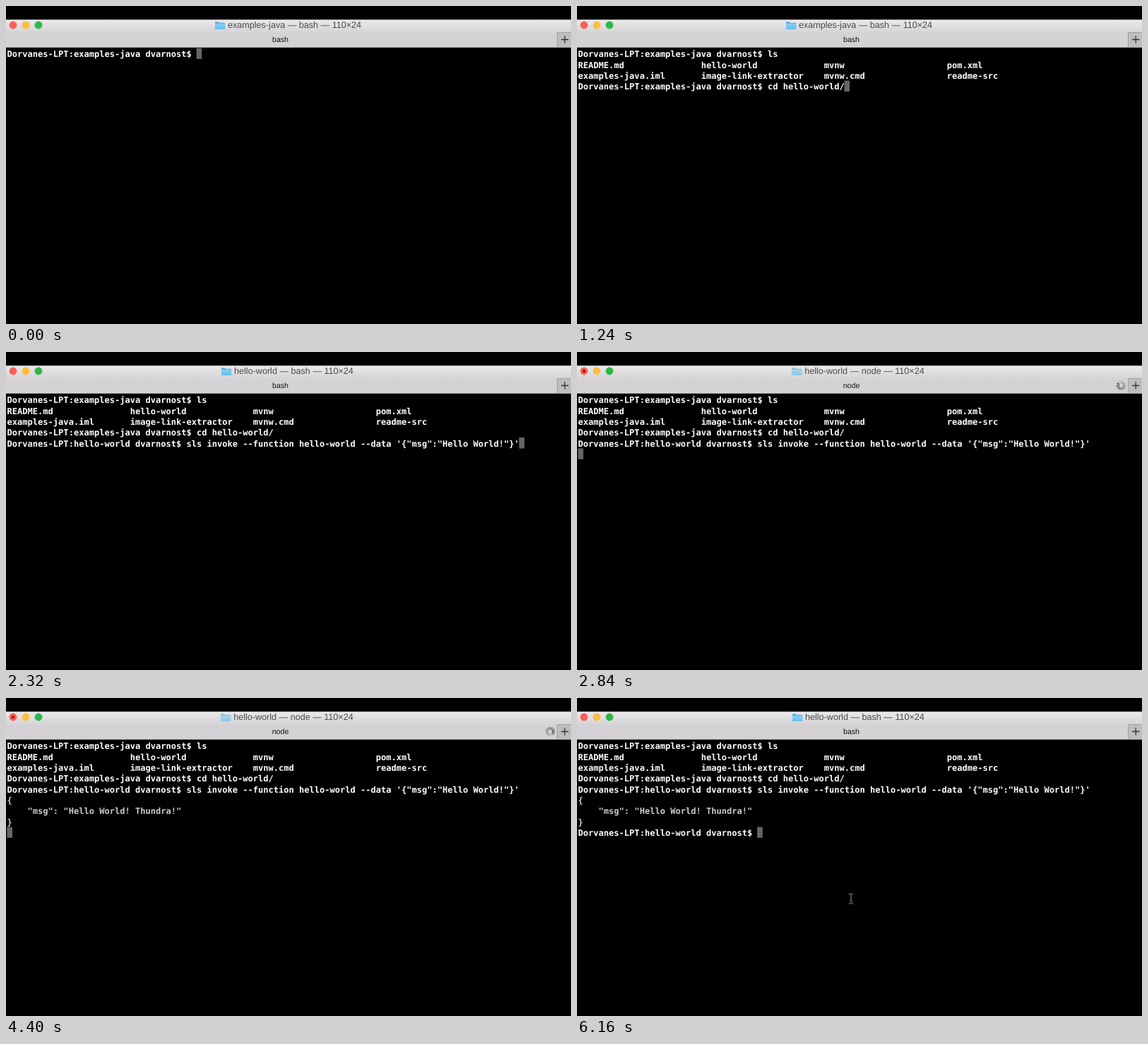
An HTML page for the animation above (6200 ms loop, 800 px wide and 450 px high).

```html
<!DOCTYPE html>
<html lang="en">
<head>
<meta charset="utf-8">
<title>Terminal session</title>
<style>
  html, body { margin: 0; width: 100%; height: 100%; overflow: hidden; background: #000; }
  svg { display: block; width: 800px; height: 450px; }
  text { white-space: pre; text-rendering: geometricPrecision; }
  .ui { font-family: "Liberation Sans", Arial, sans-serif; }
  .title { font-size: 12.6px; fill: #4b4a4b; }
  .tab { font-size: 10.6px; fill: #111; text-anchor: middle; }
  .term { font: bold 12.05px "DejaVu Sans Mono", monospace; fill: #fff; }
  .dim { fill: #cbcbcb; }
</style>
</head>
<body>
<svg viewBox="0 0 800 450">
  <defs>
    <linearGradient id="bar" x1="0" y1="0" x2="0" y2="1">
      <stop offset="0" stop-color="#ebe9eb"/>
      <stop offset="1" stop-color="#d5d3d5"/>
    </linearGradient>
    <linearGradient id="paper" x1="0" y1="0" x2="0" y2="1">
      <stop offset="0" stop-color="#84d0f6"/>
      <stop offset="1" stop-color="#67bdec"/>
    </linearGradient>
  </defs>
  <rect width="800" height="450"/>
  <rect y="19.3" width="800" height="18.7" fill="url(#bar)"/>
  <rect y="38" width="800" height="20" fill="#d4d2d4"/>
  <rect y="58" width="800" height="1" fill="#a3a1a3"/>
  <rect x="780" y="37.5" width="20" height="20.5" fill="#bfbdbf"/>
  <path d="M780.5 37.5V58M780 37.5H800" stroke="#a3a1a3" fill="none"/>
  <path d="M786 47.5H796.4M791.2 42.3V52.7" stroke="#333" stroke-width="1.3"/>

  <circle cx="10" cy="27" r="5.4" fill="#fb5f57"/>
  <circle id="busyDot" cx="10" cy="27" r="1.9" fill="#7c100c"/>
  <circle cx="28" cy="27" r="5.4" fill="#fdbd3e"/>
  <circle cx="46" cy="27" r="5.4" fill="#2fb748"/>

  <g id="heading">
    <g id="folder">
      <path d="M0 1.2Q0 0 1.2 0H4.6L6 1.5H13Q14.2 1.5 14.2 2.7V10H0Z" transform="translate(0 22.2)" fill="#58b2e6"/>
      <rect y="25" width="14.2" height="8" rx=".8" fill="url(#paper)"/>
    </g>
    <text id="title" class="ui title" x="18" y="31.4"></text>
  </g>
  <text id="tab" class="ui tab" x="388.5" y="51.2"></text>
  <g id="spinner" transform="translate(770.5 47.5)" stroke="#444" stroke-width="1.4" stroke-linecap="round"></g>

  <rect id="caret" width="7.6" height="15.4" fill="#656565"/>
  <g id="screen" class="term"></g>
  <path id="pointer" d="M-3.3 -7Q-.5 -7 0 -5.5Q.5 -7 3.3 -7M0 -5.5V5.5M-3.3 7Q-.5 7 0 5.5Q.5 7 3.3 7M-1.8 2.5H1.8"
        fill="none" stroke="#4c4c4c" stroke-width="2"/>
</svg>
<script>
  const LOOP = 6200, LEFT = 1.6, TOP = 59.6, ROW = 15.36, COL = 7.25;
  const LISTED = 400, ENTERED = 1480, RUN = 2360, BUSY = 2440, REPLY = 4320, DONE = 4600;
  const $ = id => document.getElementById(id);
  const svg = (tag, parent, attrs) => {
    const el = document.createElementNS("http://www.w3.org/2000/svg", tag);
    for (const key in attrs) el.setAttribute(key, attrs[key]);
    return parent.appendChild(el);
  };
  const show = (id, on) => $(id).setAttribute("visibility", on ? "visible" : "hidden");

  const rows = Array.from({ length: 9 }, (_, i) => svg("text", $("screen"), {
    x: LEFT, y: TOP + 12.6 + i * ROW, class: i > 4 && i < 8 ? "dim" : "", "xml:space": "preserve"
  }));
  const spokes = Array.from({ length: 12 }, (_, i) =>
    svg("path", $("spinner"), { d: "M0 -3.4V-6.3", transform: `rotate(${i * 30})` }));

  const prompt = dir => `Dorvanes-LPT:${dir} dvarnost$ `;
  const columns = (...names) => names.map(n => n.padEnd(24)).join("").trimEnd();
  const LISTING = [
    columns("README.md", "hello-world", "mvnw", "pom.xml"),
    columns("examples-java.iml", "image-link-extractor", "mvnw.cmd", "readme-src")
  ];
  const COMMAND = `sls invoke --function hello-world --data '{"msg":"Hello World!"}'`;
  const OUTPUT = ["{", `    "msg": "Hello World! Thundra!"`, "}"];

  // Latest value whose time has come
  const at = (t, keys) => keys.reduce((now, [time, value]) => t >= time ? value : now, "");

  function linesAt(t) {
    const lines = [prompt("examples-java") + at(t, [[120, "l"], [240, "ls"]])];
    if (t >= LISTED) lines.push(...LISTING, prompt("examples-java") + at(t, [
      [520, "c"], [600, "cd"], [680, "cd "], [840, "cd h"], [920, "cd he"],
      [1000, "cd hel"], [1160, "cd hello-world/"]
    ]));
    if (t >= ENTERED) lines.push(prompt("hello-world") + at(t, [[2080, COMMAND]]));
    if (t >= REPLY) lines.push(...OUTPUT);
    if (t >= RUN) lines.push(t >= DONE ? prompt("hello-world") : "");
    return lines;
  }

  const PATH = [[5000, 402, 240], [5040, 401.5, 242], [5080, 398.5, 252], [5120, 395, 264],
                [5200, 390, 278], [5320, 388, 284], [LOOP, 388, 284]];
  function pointerAt(t) {
    const i = Math.max(1, PATH.findIndex(p => p[0] > t));
    const [t0, x0, y0] = PATH[i - 1], [t1, x1, y1] = PATH[i];
    const k = (t - t0) / (t1 - t0);
    return [x0 + (x1 - x0) * k, y0 + (y1 - y0) * k];
  }

  function render(t) {
    const lines = linesAt(t);
    rows.forEach((row, i) => {
      const line = lines[i] || "";
      if (row.textContent !== line) row.textContent = line;
    });
    const last = lines.length - 1;
    $("caret").setAttribute("x", LEFT + lines[last].length * COL - .2);
    $("caret").setAttribute("y", TOP + last * ROW);

    const busy = t >= BUSY && t < DONE, app = busy ? "node" : "bash";
    const moved = t >= ENTERED;
    $("title").textContent = `${moved ? "hello-world" : "examples-java"} — ${app} — 110×24`;
    $("tab").textContent = app;
    $("heading").setAttribute("transform", `translate(${busy ? 304.2 : moved ? 305 : 296} 0)`);
    $("folder").setAttribute("opacity", busy ? .65 : 1);
    show("busyDot", busy);
    show("spinner", busy);
    const head = Math.floor(t / 83.3);
    spokes.forEach((s, i) => s.setAttribute("opacity", 1 - ((head - i) % 12 + 12) % 12 * .068));

    const visible = t >= PATH[0][0];
    show("pointer", visible);
    if (visible) $("pointer").setAttribute("transform", `translate(${pointerAt(t).join(" ")})`);
  }

  const start = performance.now();
  function frame() {
    render((performance.now() - start) % LOOP);
    requestAnimationFrame(frame);
  }
  frame();
</script>
</body>
</html>
```
